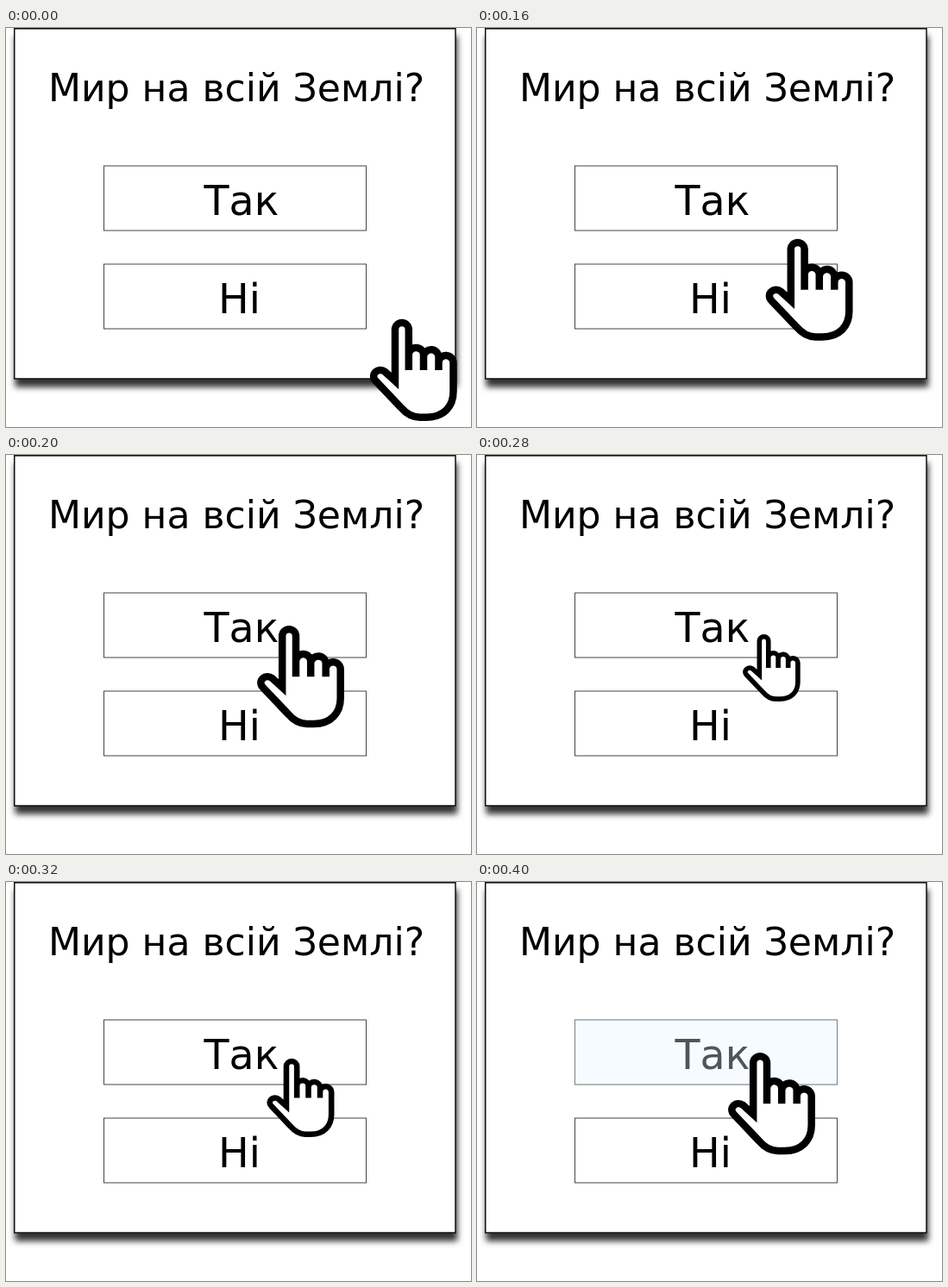
Write an HTML page that moves like this. It is 539 px wide and 463 px high and loops after 440 ms.

```html
<!DOCTYPE html>
<html lang="uk">
<head>
<meta charset="utf-8">
<style>
  html, body { margin: 0; width: 100%; height: 100%; overflow: hidden; background: #fff; }
  svg { display: block; }
  text { font-family: "DejaVu Sans", Verdana, sans-serif; text-anchor: middle; }
  .button { fill: #fff; stroke: #444; }
</style>
</head>
<body>
<svg width="539" height="463" viewBox="0 0 539 463">
  <filter id="shadow" x="-5%" y="-5%" width="110%" height="115%">
    <feDropShadow dx="1.5" dy="9" stdDeviation="3.8" flood-opacity=".8"/>
  </filter>
  <rect x="9.75" y=".75" width="511.25" height="406.25" fill="#fff" stroke="#111" stroke-width="1.5" filter="url(#shadow)"/>
  <text x="267" y="85" font-size="44.1">Мир на всій Землі?</text>

  <rect class="button" x="113.5" y="160" width="304" height="75"/>
  <text x="273" y="216.5" font-size="47.5">Так</text>
  <rect id="highlight" x="113" y="159.5" width="305" height="76" fill="#e2f2ff"/>

  <rect class="button" x="113.5" y="274" width="304" height="75"/>
  <text x="270.5" y="331" font-size="47.5">Ні</text>

  <path id="hand" fill="#fff" stroke="#000" stroke-width="8.5" d="
    M45.3 59 V12 A7.9 7.9 0 0 0 29.5 12 V71.5 L18 61
    C10 55 0 64 7 71.5 L36 102 Q46 113.7 58 113.7 H66
    C86 113.7 97 101 97 84 V51
    A8.5 8.5 0 0 0 80 50 V59 V45
    A8.75 8.75 0 0 0 62.5 43 V59 V42
    A8.6 8.6 0 0 0 45.3 41"/>
</svg>
<script>
  const LOOP = 440, HOLD = 120, STEP = 40;
  const PIVOT = { x: 50.5, y: 29 };
  const hand = document.getElementById('hand');
  const highlight = document.getElementById('highlight');

  // Steps 0-3 approach the button, 3-5 press, 5-8 release.
  function handScale(step) {
    if (step <= 3) return 1;
    return step <= 5 ? 1 - 0.17 * (step - 3) : 1 - 0.113 * (8 - step);
  }

  function draw() {
    const time = performance.now() % LOOP;
    const step = time < HOLD ? 0 : Math.floor((time - HOLD) / STEP) + 1;
    const travel = Math.min(step, 3);
    const x = 421.5 - 43.6 * travel + PIVOT.x;
    const y = 338 - 46.6 * travel + PIVOT.y;
    hand.setAttribute('transform',
      `translate(${x} ${y}) scale(${handScale(step)}) translate(${-PIVOT.x} ${-PIVOT.y})`);
    highlight.setAttribute('opacity', 0.35 * Math.max(0, (step - 6) / 2));
    requestAnimationFrame(draw);
  }
  draw();
</script>
</body>
</html>
```
